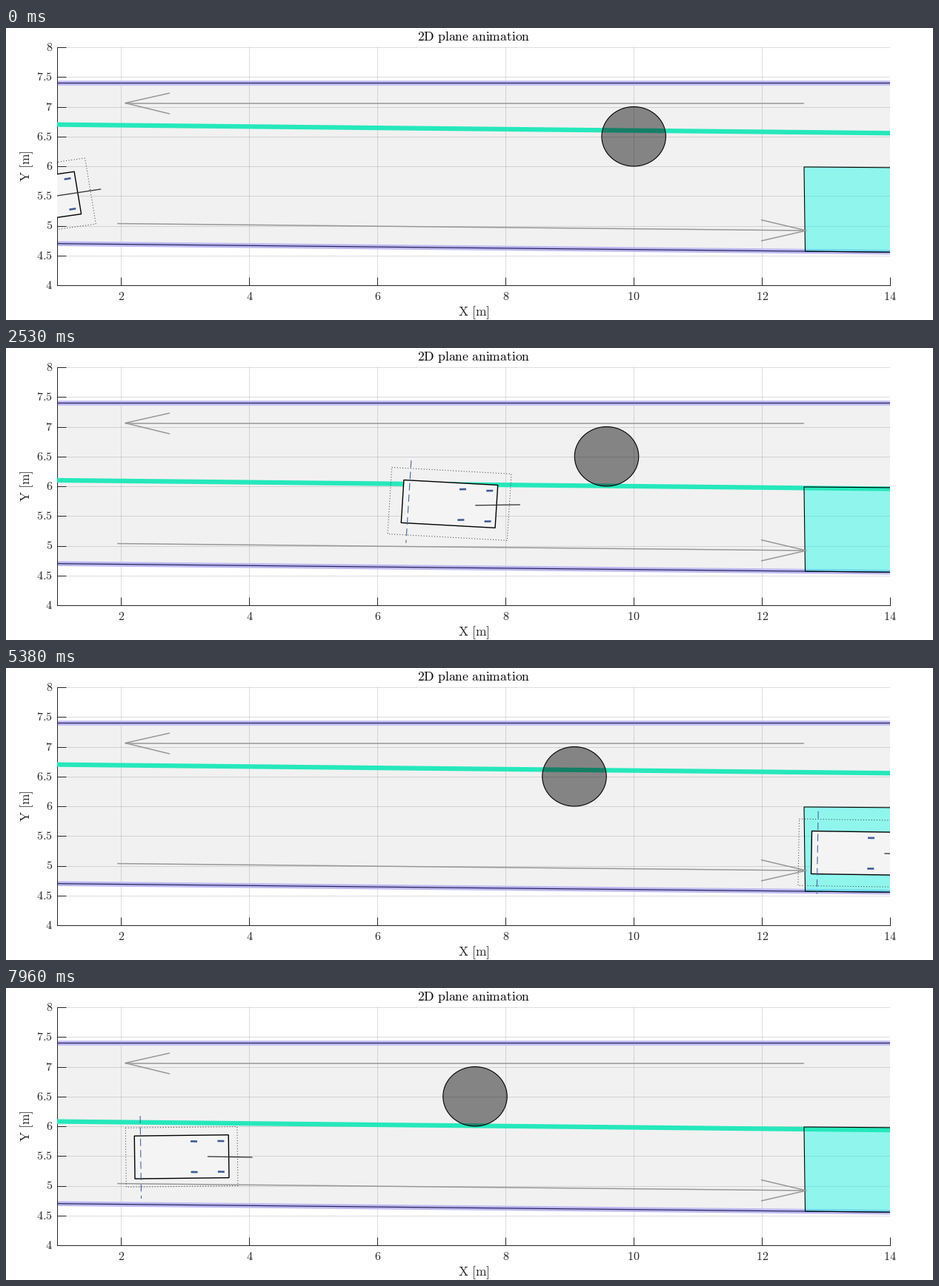
Write a matplotlib script that moves like this. It is 1251x395 px and loops after 8 s.

```python
import numpy as np
import matplotlib.pyplot as plt
from matplotlib.animation import FuncAnimation
from matplotlib.patches import Circle, Polygon

W, H, DPI = 1251, 395, 64
P = 72 / DPI                      # points per pixel
STEP = 0.04                       # seconds per frame
FRAMES = 200
LEFT, RIGHT, TOP, BOTTOM = 69, 1193, 26, 348
INK = "#262626"

plt.rcParams["mathtext.fontset"] = "cm"
fig = plt.figure(figsize=(W / DPI, H / DPI), dpi=DPI, facecolor="white")
ax = fig.add_axes([LEFT / W, 1 - BOTTOM / H, (RIGHT - LEFT) / W, (BOTTOM - TOP) / H])
ax.set(xlim=(1, 14), ylim=(4, 8), xticks=np.arange(2, 15, 2), yticks=np.arange(4, 8.1, 0.5))
ax.patch.set_visible(False)
ax.set_axisbelow(True)
ax.grid(color=INK, alpha=0.15, lw=P)
ax.tick_params(direction="in", length=11.5 * P, width=P, color=INK,
               labelbottom=False, labelleft=False)
for side, spine in ax.spines.items():
    spine.set_visible(side in ("left", "bottom"))
    spine.set(linewidth=P, color=INK)


def label(x, y, words, size, color=INK, **kw):
    text = r"$\mathrm{" + words.replace(" ", r"\ ") + "}$"
    kw = {"ha": "center", "va": "baseline", **kw}
    fig.text(x / W, 1 - y / H, text, fontsize=size * P, color=color, **kw)


def line(xs, ys, color, width, z, **kw):
    return ax.plot(xs, ys, color=color, lw=width * P, zorder=z,
                   solid_capstyle="butt", dash_capstyle="butt", **kw)[0]


def shape(points, z, **kw):
    patch = Polygon(points, closed=True, zorder=z, joinstyle="miter", **kw)
    return ax.add_patch(patch)


# Texts
label(631, 17, "2D plane animation", 17.6, "black")
label(631, 389, "X [m]", 17.6)
label(32.5, 187, "Y [m]", 17.6, rotation=90, rotation_mode="anchor")
for v in range(2, 15, 2):
    label(LEFT + (v - 1) * (RIGHT - LEFT) / 13, 367.5, str(v), 16)
for v in np.arange(4, 8.1, 0.5):
    label(63, BOTTOM - (v - 4) * (BOTTOM - TOP) / 4 + 5, f"{v:g}", 16, ha="right")

# Road, borders, goal area and lane arrows
SLOPE = -0.144 / 13
ENDS = np.array([1, 14])
road_low = 4.7 + SLOPE * (ENDS - 1)
shape([(1, 7.4), (14, 7.4), (14, road_low[1]), (1, road_low[0])], 0.4,
      fc="#f1f1f1", ec="none")
for border in (np.array([7.4, 7.4]), road_low):
    line(ENDS, border, "#bdb8f0", 6.5, 2)
    line(ENDS, border, "#25255c", 1.2, 2.1)

goal = [(12.658, 5.988), (14.5, 5.973), (14.5, 4.551), (12.676, 4.571)]
shape(goal, 2.5, fc=(0, 1, 0.914, 0.4), ec="none")
shape(goal, 3.5, fc="none", ec="black", lw=1.1 * P)

for tail, tip, back, high, low in (
        ((12.66, 7.062), (2.064, 7.062), 2.758, 7.23, 6.88),
        ((1.937, 5.037), (12.693, 4.919), 11.988, 5.099, 4.745)):
    line(*zip(tail, tip), "#979797", 1.5, 3.6)
    line([back, tip[0], back], [high, tip[1], low], "#979797", 1.5, 3.6)

# Moving parts
teal = line(ENDS, ENDS, "#25e8bb", 6.2, 3)
ball = ax.add_patch(Circle((10, 6.5), 0.5, fc=(0, 0, 0, 0.45), ec="black",
                           lw=1.1 * P, zorder=4))
SQUARE = np.zeros((4, 2))
body = shape(SQUARE, 5, fc="#f4f4f4", ec="black", lw=1.4 * P)
hull = shape(SQUARE, 5.1, fc="none", ec="#333333", lw=P, ls=(0, (1, 2.6)))
axle = line([], [], "#43659b", 1.1, 5.2, ls=(0, (9, 5)))
wheels = line([], [], "#3f5a94", 2.6, 5.2)
pointer = line([], [], "#333333", 1.3, 5.3)

# Knots: time, rear axle x and y, heading, steering direction, ball x
RUN_A = np.array([
    [0.00, -0.036, 5.343, 8.8, 9.3, 10.0],
    [1.92, 4.817, 5.920, 1.7, 2.0, 9.686],
    [3.16, 8.294, 5.408, -7.0, 0.0, 9.460],
    [4.12, 10.945, 5.260, -1.7, -1.0, 9.299],
    [5.36, 12.869, 5.222, -0.9, -0.9, 9.073],
    [6.64, 14.360, 5.200, -0.9, -0.9, 8.876]])
RUN_B = np.array([
    [6.70, -0.750, 5.400, 3.0, 2.0, 7.74],
    [7.96, 2.305, 5.478, 0.7, -1.0, 7.523]])
RESTART = 6.7


def slopes(run):
    m = np.gradient(run, run[:, 0], axis=0)
    m[:, 2] = m[:, 1] * np.tan(np.radians(run[:, 3]))   # axle rolls along its heading
    return m


def pose(run, t):
    """Cubic Hermite through the knots of one run."""
    m = slopes(run)
    k = int(np.clip(np.searchsorted(run[:, 0], t, "right") - 1, 0, len(run) - 2))
    h = run[k + 1, 0] - run[k, 0]
    s = min((t - run[k, 0]) / h, 1)
    p = (run[k] * (2 * s**3 - 3 * s**2 + 1) + run[k + 1] * (3 * s**2 - 2 * s**3)
         + h * (m[k] * (s**3 - 2 * s**2 + s) + m[k + 1] * (s**3 - s**2)))
    return p[1:]


def lane_height(t):
    if t >= RESTART:
        return 6.08
    return 6.1 if 2.05 <= t < 3.95 else 6.7


def turn(points, degrees):
    a = np.radians(degrees)
    c, s = np.cos(a), np.sin(a)
    return np.asarray(points) @ np.array([[c, s], [-s, c]])


def box(margin):
    x0, x1, y = -0.095 - margin, 1.374 + margin, 0.36 + margin
    return [(x0, y), (x1, y), (x1, -y), (x0, -y)]


def update(i):
    t = i * STEP
    second = t >= RESTART - 1e-9
    x, y, heading, steer, ball_x = pose(RUN_B if second else RUN_A, t)
    origin = np.array([x, y])

    def place(points):
        return turn(points, heading) + origin

    teal.set_ydata(lane_height(t) + SLOPE * (ENDS - 1))
    ball.center = ball_x, 6.5
    body.set_xy(place(box(0)))
    hull.set_xy(place(box(0.137 if second else 0.2)))
    axle.set_data(*place([(0, 0.695), (0, -0.695)]).T)
    hub = place([(1.0425, 0)])[0]
    pointer.set_data(*np.array([hub, hub + turn([0.7, 0], steer)]).T)
    half = turn([0.052, 0], steer)
    marks = []
    for dx in (-0.21, 0.21):
        for dy in (-0.258, 0.258):
            c = place([(1.0425 + dx, dy)])[0]
            marks += [c - half, c + half, (np.nan, np.nan)]
    wheels.set_data(*np.array(marks).T)
    return teal, ball, body, hull, axle, wheels, pointer


anim = FuncAnimation(fig, update, frames=FRAMES, interval=1000 * STEP,
                     repeat=True, repeat_delay=0, blit=False)
plt.show()
```
